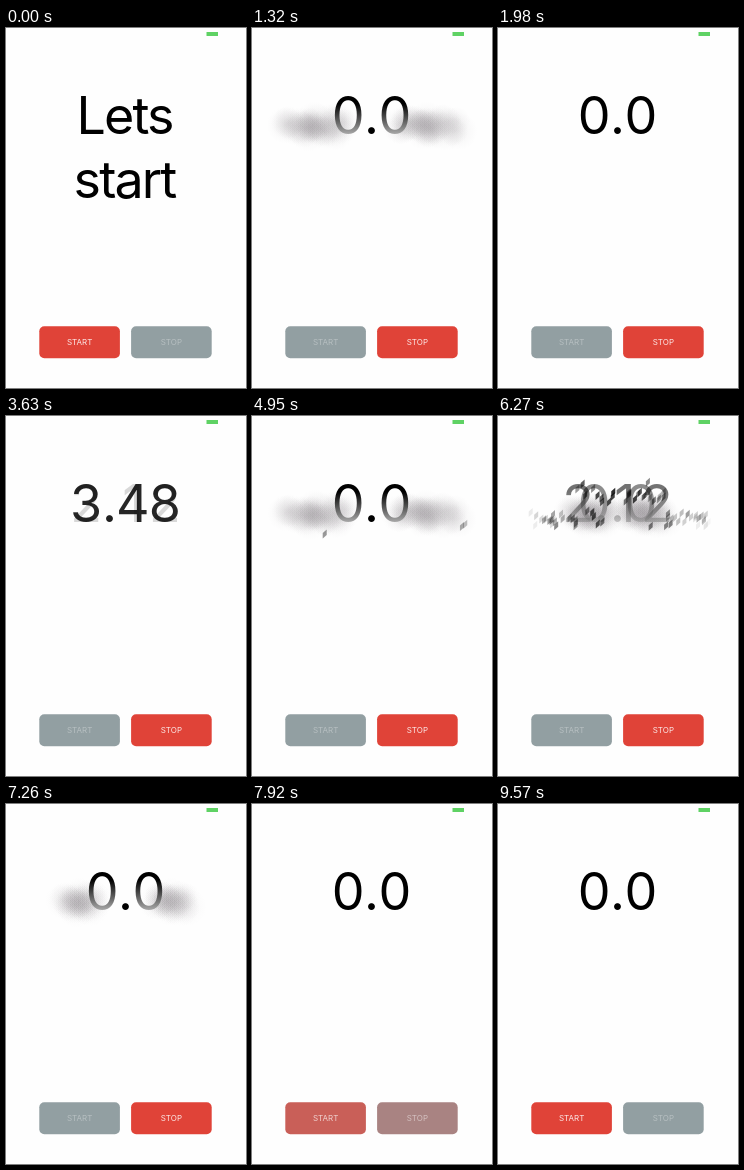
An HTML page with a canvas for the animation above (9.9 s loop, 240x360 px).

```html
<!DOCTYPE html>
<html>
<head>
<meta charset="utf-8">
<style>
  html, body { margin: 0; width: 240px; height: 360px; overflow: hidden; background: #fefefe }
  canvas { display: block }
</style>
</head>
<body>
<canvas id="stage" width="240" height="360"></canvas>
<script>
const ctx = document.getElementById('stage').getContext('2d');
const LOOP = 9900, STEP = 330, CENTER = 119.5, BASE = 105.5;
const FADE = 600, SMOKE = 1450, START = 500, STOP = 7500;
const DIGIT = 32.2, DOT = 14.5;
const RED = [224, 67, 56], GRAY = [146, 159, 162];

// When each text begins to appear
const cues = [
  [-9999, 'Lets start'], [START, '0.0'], [2300, '3.48'], [3540, '2.12'],
  [4200, '0.0'], [4980, '3.48'], [5500, '2.12'], [6000, '0.0']
];

const clamp = v => Math.max(0, Math.min(1, v));

function seeded(seed) {
  return () => (seed = seed * 16807 % 2147483647) / 2147483647;
}

function setFont(size, spacing) {
  ctx.font = `400 ${size}px Inter, "Liberation Sans", sans-serif`;
  ctx.letterSpacing = spacing + 'px';
}

function words(text) {
  setFont(52, -1.9);
  ctx.fillStyle = '#000';
  text.split(' ').forEach((line, i) => ctx.fillText(line, CENTER - 1, BASE + i * 64.5));
}

// Equal-width digits, paler towards the bottom while smoke surrounds them
function number(text, shade, solidDot) {
  setFont(52, 0);
  const fill = ctx.createLinearGradient(0, 76, 0, BASE), low = 165 * shade;
  fill.addColorStop(0, '#000');
  fill.addColorStop(1, `rgb(${low},${low},${low})`);
  let x = CENTER - ((text.length - 1) * DIGIT + DOT) / 2;
  for (const c of text) {
    const width = c === '.' ? DOT : DIGIT;
    ctx.fillStyle = c === '.' && solidDot ? '#000' : fill;
    ctx.fillText(c, x + width / 2, BASE);
    x += width;
  }
}

function label(text, alpha, shade) {
  ctx.globalAlpha = alpha;
  if (text.includes('.')) number(text, shade, alpha === 1);
  else words(text);
  ctx.globalAlpha = 1;
}

function smoke(age) {
  const p = age / SMOKE, rnd = seeded(41), swell = Math.sin(Math.PI * p);
  const mean = 38 * swell + 36 * p, spread = 6 + 22 * swell;
  const alpha = 0.1 * Math.min(1, (1 - p) * 5);
  for (let i = 0; i < 64; i++) {
    const side = i % 2 ? 1 : -1;
    const x = CENTER + side * (mean + (rnd() + rnd() - 1) * 1.3 * spread);
    const y = 98 + (rnd() - 0.5) * 12, r = 13 + rnd() * 7;
    const puff = ctx.createRadialGradient(x, y, 0, x, y, r);
    puff.addColorStop(0, `rgba(150,145,150,${alpha})`);
    puff.addColorStop(1, 'rgba(150,145,150,0)');
    ctx.fillStyle = puff;
    ctx.fillRect(x - r, y - r, 2 * r, 2 * r);
  }
}

function fragments(age) {
  const rnd = seeded(977), travel = 1 - Math.exp(-age / 120);
  ctx.fillStyle = '#111';
  for (let i = 0; i < 74; i++) {
    const side = i % 2 ? 1 : -1, reach = 4 + rnd() * 98;
    const life = 300 + 520 * rnd() ** 3, height = rnd(), tone = rnd();
    if (age > life) continue;
    const x = CENTER + side * reach * travel;
    const y = (reach > 52 ? 95 + height * 14 : 65 + height * 44) + 6 * (age / 600) ** 2;
    ctx.globalAlpha = clamp(0.95 - reach / 150 - tone * 0.35);
    ctx.beginPath();
    ctx.moveTo(x - 2, y - 1);
    ctx.lineTo(x + 2, y - 4.5);
    ctx.lineTo(x + 2, y + 1);
    ctx.lineTo(x - 2, y + 4.5);
    ctx.fill();
  }
  ctx.globalAlpha = 1;
}

function button(x, text, on) {
  const mix = (a, b) => a + (b - a) * on;
  ctx.fillStyle = `rgb(${GRAY.map((c, i) => mix(c, RED[i]))})`;
  ctx.beginPath();
  ctx.roundRect(x, 298.3, 80.6, 32, 5);
  ctx.fill();
  setFont(8, 0);
  ctx.fillStyle = `rgba(255,255,255,${mix(0.34, 0.88)})`;
  ctx.fillText(text, x + 40.3, 317.3);
}

function draw(t) {
  ctx.fillStyle = '#fefefe';
  ctx.fillRect(0, 0, 240, 360);
  ctx.textAlign = 'center';
  ctx.fillStyle = '#5fd264';
  ctx.fillRect(200.5, 4, 11.5, 4);

  const now = cues.findLastIndex(cue => cue[0] <= t);
  const [begin, text] = cues[now], age = t - begin, p = clamp(age / FADE);
  const active = age > 150 && age < SMOKE;
  const shade = active ? clamp((age - 150) / 150) * clamp((SMOKE - age) / 180) : 0;
  if (active) smoke(age);
  if (p < 1) label(cues[now - 1][1], 1 - p, shade);
  label(text, p, shade);
  if (active) fragments(age);

  const running = clamp((t - START) / 300) - clamp((t - STOP) / 600);
  button(33.3, 'START', 1 - running);
  button(125.1, 'STOP', running);
}

function tick() {
  const t = performance.now() % LOOP;
  draw(Math.floor(t / STEP) * STEP);
  requestAnimationFrame(tick);
}
tick();
</script>
</body>
</html>
```
